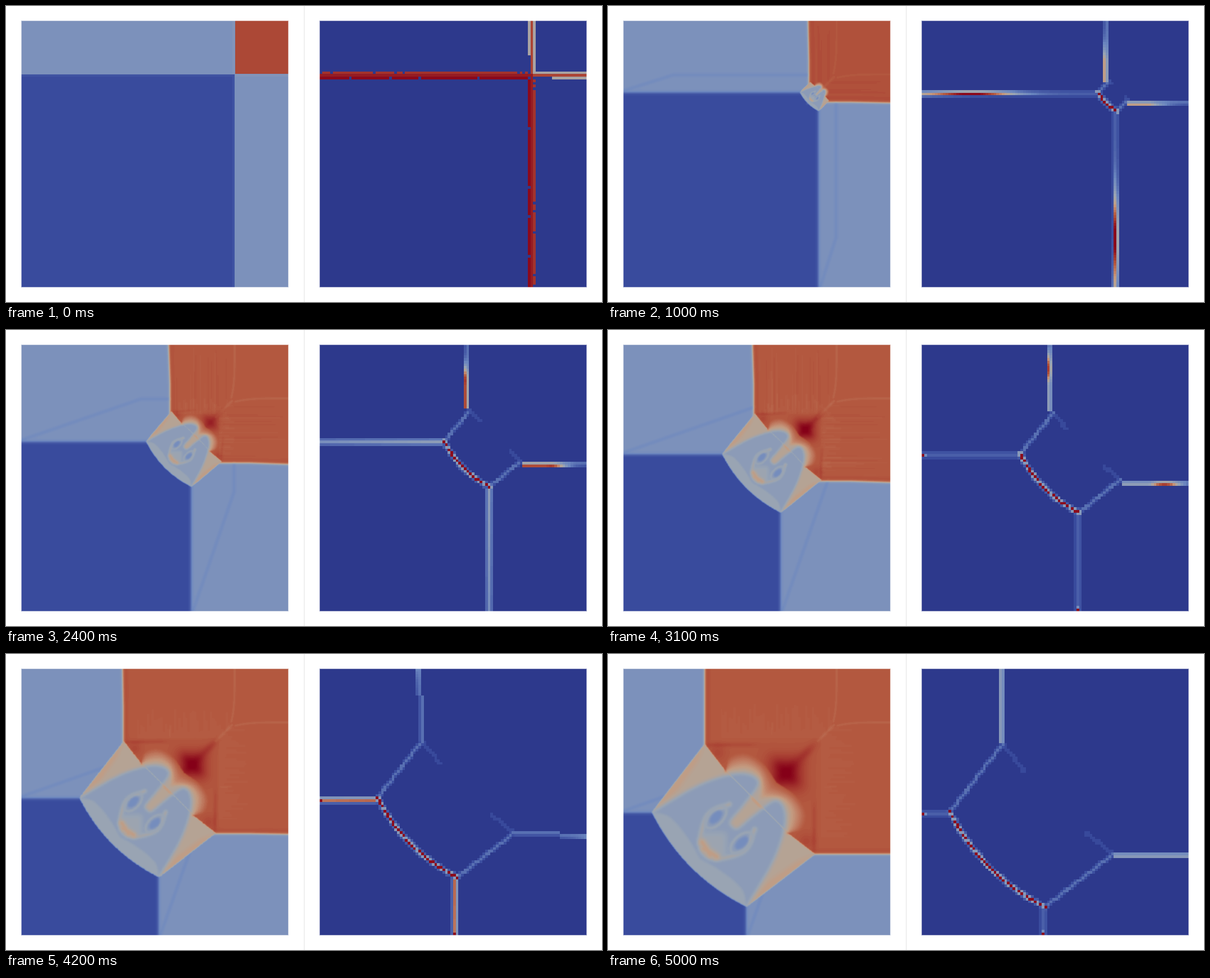
Write a matplotlib script that moves like this. It is 1061 px wide and 528 px high and loops after 5100 ms.

```python
import numpy as np
import matplotlib.pyplot as plt
from matplotlib.animation import FuncAnimation
from matplotlib.colors import LinearSegmentedColormap
from matplotlib.path import Path

W, H, DPI = 1061, 528, 64
SIDE, CELLS = 475, 100              # panels start and end on half pixels
N = SIDE + 1
LEFT_PANEL, RIGHT_PANEL, TOP_EDGE = 27, 558, 26
X0, Y0 = LEFT_PANEL + .5, TOP_EDGE + .5
CELL = SIDE / CELLS
CX, CY = X0 + .8 * SIDE, Y0 + .2 * SIDE
AXIS = CX + CY                      # the picture is symmetric about x + y = AXIS
FRAMES, STEP = 51, 100

STOPS = [(0, "#2d398c"), (.07, "#3a4c9e"), (.25, "#6b86bf"), (.33, "#7c91bb"),
         (.46, "#99a4b3"), (.57, "#b5a394"), (.63, "#c39a80"), (.70, "#c07f65"),
         (.80, "#b3583f"), (.84, "#ad4937"), (.90, "#a02f2b"), (1, "#850018")]
LEVELS = 101
LUT = (LinearSegmentedColormap.from_list("cw", STOPS)(np.linspace(0, 1, LEVELS))[:, :3]
       * 255).round().astype(np.uint8)

Y, X = np.mgrid[0:N, 0:N]
X, Y = X + X0, Y + Y0
UPPER = X + Y <= AXIS
GRID = np.column_stack([X.ravel(), Y.ravel()])
FREQ2 = np.add.outer(np.fft.fftfreq(N) ** 2, np.fft.fftfreq(N) ** 2)


def flip(a):
    return a[::-1, ::-1].T


def bell(v, mid, width):
    return np.exp(-((v - mid) / width) ** 2)


def step(v, width):
    return 1 / (1 + np.exp(-np.clip(v / width, -40, 40)))


def colour(v):
    return LUT[np.clip(np.rint(v * (LEVELS - 1)), 0, LEVELS - 1).astype(int)]


def spline(pts, n=8):
    p = np.array(pts, float)
    p = np.vstack([2 * p[0] - p[1], p, 2 * p[-1] - p[-2]])
    u = np.linspace(0, 1, n, endpoint=False)[:, None]
    out = [b + u * (c - a) / 2 + u**2 * (a - 2.5 * b + 2 * c - d / 2)
           + u**3 * (1.5 * (b - c) + (d - a) / 2)
           for a, b, c, d in zip(p, p[1:], p[2:], p[3:])]
    return np.vstack(out + [p[-2:-1]])


def line_dist(x, y, pts):
    best = np.full(x.shape, 1e9)
    for (ax_, ay), (bx, by) in zip(pts[:-1], pts[1:]):
        dx, dy = bx - ax_, by - ay
        u = np.clip(((x - ax_) * dx + (y - ay) * dy) / (dx * dx + dy * dy + 1e-9), 0, 1)
        best = np.minimum(best, np.hypot(x - ax_ - u * dx, y - ay - u * dy))
    return best


def area(pts, sigma):
    m = Path(pts).contains_points(GRID).reshape(N, N).astype(float)
    blur = np.exp(-2 * np.pi**2 * sigma**2 * FREQ2)
    return np.clip(np.fft.ifft2(np.fft.fft2(np.maximum(m, flip(m))) * blur).real, 0, 1)


def stroke(pts, width):
    m = bell(line_dist(X, Y, spline(pts)), 0, width)
    return np.maximum(m, flip(m))


# Interaction zone at its largest; earlier times are scaled copies.
# Only the half above the axis is described, the rest is mirrored.
TOP, LEFT, KINK, INNER = (172, 160), (78, 282), (209, 208), (268, 267)
EYE = np.array([192, 291])


def bow(bulge=20, n=14):
    u = np.linspace(0, .55, n)[:, None]
    start = np.array(LEFT, float)
    end = AXIS - start[::-1]
    return start + u * (end - start) + 4 * bulge * u * (1 - u) * np.array([-1, 1]) / 2**.5


def oval(r1, r2, tilt=-.83):
    a = np.linspace(0, 2 * np.pi, 20)
    c, s = np.cos(tilt), np.sin(tilt)
    x, y = r1 * np.cos(a), r2 * np.sin(a)
    return EYE + np.column_stack([x * c - y * s, x * s + y * c])


def build_zone():
    v = np.full((N, N), .57)

    def paint(mask, val):
        v[:] = v * (1 - mask) + val * mask

    arc = bow()
    outside = arc[::-1] + [-12, 12]
    hull = np.vstack([arc[::-1], [TOP, KINK, INNER]])
    outer = np.array([KINK, (217, 183), (245, 176), (275, 194), (301, 231)], float)
    inner = np.array([(209, 212), (228, 210), (252, 211), (270, 228), INNER], float)

    paint(area([KINK, (190, 110), (420, 110), INNER], 1), .80)
    for k in np.linspace(0, 1, 8):
        rim = spline(outer * (1 - k) + inner * k)
        paint(area(np.vstack([rim, [INNER]]), 2), .79 - .24 * k)
    paint(area([LEFT, TOP, (158, 192), (122, 243)], 4), .625)

    jet = spline([LEFT, (165, 232), (235, 213), (268, 229), (242, 269), (217, 300), (225, 311)])
    paint(area(np.vstack([jet, outside]), 3.5), .40)
    body = spline([LEFT, (110, 291), (142, 328), (167, 371)])
    paint(area(np.vstack([body, outside]), 2), .46)

    # rolled-up vortex pair
    paint(area([(167, 318), (212, 318), (172, 364)], 5), .47)
    paint(stroke([(216, 268), (178, 287), (164, 335), (175, 358)], 5), .50)
    paint(stroke([(168, 336), (182, 358)], 7), .61)
    paint(stroke(oval(24, 13), 3), .46)
    paint(area(oval(15, 8), 2), .30)

    rim = np.vstack([spline(outer), [INNER]])
    return v, np.maximum(area(hull, .7), area(rim, 1))


ZONE, ALPHA = build_zone()

rng = np.random.default_rng(7)
COMB = np.repeat(rng.uniform(5, 62, N // 4), 4)
STREAK = np.repeat(rng.normal(0, 1, N // 2), 2)
REACH = np.repeat(rng.uniform(0, 70, N // 2), 2)


def top_shock(t, y):
    lean = 2.5 * np.sin(np.pi * t / 5)
    return 404.8 - 47.6 * t + .2 * t * t - lean * np.clip(1 - (y - Y0) / 70, 0, 1)


def left_shock(t):
    return 122 + 32.2 * t


def top_drop(t):
    """The upper triple point starts lower than pure scaling gives."""
    return min(9 * (1 - t / 5), 8 * t)


def density_start():
    v = np.where(Y > CY, .07, np.where(X > CX, .84, .33))
    v[(X > CX - CELL) & (X < CX) & (Y < CY)] = .36
    v[(Y > CY) & (Y < CY + CELL) & (X < CX)] = .09
    return np.where(UPPER, v, flip(v))


def density(t):
    if t == 0:
        return density_start()
    s = t / 5
    xs, ys = top_shock(t, Y), left_shock(t)
    mx, my = CX + (X - CX) / s, CY + (Y - CY) / s
    my = my - top_drop(t) / s * bell(np.hypot(mx - TOP[0], my - TOP[1]), 0, 90)

    # light and dark blue states with the faint contact line
    fold = ys - 3 + (126 - ys) * np.minimum(1, (X - X0) / (88.7 * t))
    v = .33 - .045 * bell(Y, fold, 3) * min(1, t)
    v = v + (.07 - v) * step(Y - ys, 1.4)

    # red state with start-up ripples
    ramp = min(1, t)
    late = np.clip((t - 3.1) / 1.2, 0, 1)
    red = np.full((N, N), .84 - .04 * min(1, t / 2.4))
    zone = (X > xs + 9) & (X < 398) & (Y < 150)
    red += .006 * STREAK * ramp * (1 - .8 * late) * (zone & (Y > Y0 + REACH))
    red -= .012 * ramp * (zone & (X > xs + 30 * s) & (Y > 150 - COMB * s))
    red += .02 * bell(X, xs + 6, 4) * min(1, t / 3)
    red -= .03 * ramp * bell(X, 407 - 6 * ((Y - Y0) / 95) ** 4, 2) * (Y < 122)
    along, across = (X - Y - CX + CY) / 2**.5, (X + Y - AXIS) / 2**.5
    red -= .03 * ramp * bell(across, 0, 2.5) * ((along < -5) & (along > -50 * min(1, t / 1.6)))

    # dense core and its arms
    grow = np.clip((t - 1.2) / 1.9, 0, 1)
    dx, dy = mx - 317, my - 212
    r = np.hypot(dx, dy) * (1 + .1 * np.cos(4 * np.arctan2(dy, dx)))
    a, b = (dx - dy) / 2**.5, (dx + dy) / 2**.5
    red += grow * (.21 * bell(r, 0, 30) + .06 * bell(a, 52, 22) * bell(b, 0, 8))
    red += .035 * grow * bell(my, 162, 4) * step(mx - 178, 4) * step(262 - mx, 6)
    red += .04 * min(1, t / 2) * bell(np.hypot(mx - 195, my - 176), 0, 15)
    v = v + (red - v) * step(X - xs, 1.1)

    # scaled interaction zone
    j = np.clip(np.rint(mx - X0), 0, N - 1).astype(int)
    i = np.clip(np.rint(my - Y0), 0, N - 1).astype(int)
    v = v + (ZONE[i, j] - v) * ALPHA[i, j]
    v = np.where(UPPER, v, flip(v))

    p = np.pad(v, 1, mode="edge")
    p = (p[:-2] + 2 * p[1:-1] + p[2:]) / 4
    return (p[:, :-2] + 2 * p[:, 1:-1] + p[:, 2:]) / 4


ROW, COL = np.mgrid[0:CELLS, 0:CELLS] + .5


def sensor_start():
    gaps = np.random.default_rng(3).random((2, 78)) > .1
    w = np.zeros((CELLS, CELLS))
    w[19, :78], w[20, :80], w[21, :78] = .89 * gaps[0], .94, .98 * gaps[1]
    w[:13, 78], w[:20, 79], w[:20, 80] = .52, .85, .52
    return np.maximum(w, flip(w))


def sensor(t):
    if t == 0:
        return sensor_start()
    w = np.zeros((CELLS, CELLS))

    def place(pts, drop=0):
        p = np.array([CX, CY]) + (np.array(pts, float) - [CX, CY]) * t / 5
        return (p + [0, drop] - [X0, Y0]) / CELL

    def mark(r, c, val):
        if 0 <= r < CELLS and 0 <= c < CELLS:
            w[r, c] = max(w[r, c], min(val, .98))

    def trace(pts, *bands):
        d = line_dist(COL, ROW, pts)
        for reach, val in bands:
            w[d < reach] = np.maximum(w[d < reach], val)

    corner, top = place([LEFT])[0], place([TOP], top_drop(t))[0]

    # a shock flares according to where it sits inside its cell
    for c in range(int(corner[0])):
        pos = (left_shock(t) - Y0) / CELL + .5 * (c / 66 - .75) / t**2
        q, r = pos % 1, int(round(pos))
        mid, hot = bell(q, .42, .15), bell(q, .65, .12)
        mark(r, c, .13 + .31 * mid + .85 * hot)
        mark(r - 1, c, .09 + .12 * mid + .38 * hot)
        mark(r + 1, c, .07 + .14 * mid)
        if c == 0 and mid < .5:
            mark(r, 0, .97)
            mark(r, 1, .3)
    for r in range(int(top[1])):
        pos = (top_shock(t, Y0 + (r + .5) * CELL) - X0) / CELL
        hot, c = bell(pos % 1, .58, .2), int(pos)
        mark(r, c - 1, .1 + .77 * hot)
        mark(r, c, .18 + .32 * hot)

    trace([corner, top], (1, .08), (.42, .18))
    trace([top, place([KINK])[0]], (.75, .065))
    trace(place(bow()), (1.3, .11), (.75, .38), (.33, .97))
    return np.where(COL + ROW <= CELLS, w, flip(w))


PIX = np.minimum(np.arange(N) / CELL, CELLS - 1).astype(int)
stage = np.full((H, W, 3), 255, np.uint8)
stage[:, 530:532] = 240


def put(img, x, rgb):
    """Paste a panel; its outermost pixels are half covered."""
    rgb = rgb.copy()
    for edge in (rgb[0], rgb[-1], rgb[1:-1, 0], rgb[1:-1, -1]):
        edge[:] = edge // 2 + 127
    img[TOP_EDGE:TOP_EDGE + N, x:x + N] = rgb


fig = plt.figure(figsize=(W / DPI, H / DPI), dpi=DPI, facecolor="white")
ax = fig.add_axes([0, 0, 1, 1])
ax.axis("off")
view = ax.imshow(stage, aspect="auto", interpolation="nearest")


def draw(k):
    t = k * STEP / 1000
    img = stage.copy()
    put(img, LEFT_PANEL, colour(density(t)))
    put(img, RIGHT_PANEL, colour(sensor(t)[np.ix_(PIX, PIX)]))
    view.set_data(img)
    return [view]


anim = FuncAnimation(fig, draw, frames=FRAMES, interval=STEP, repeat=True)
plt.show()
```
